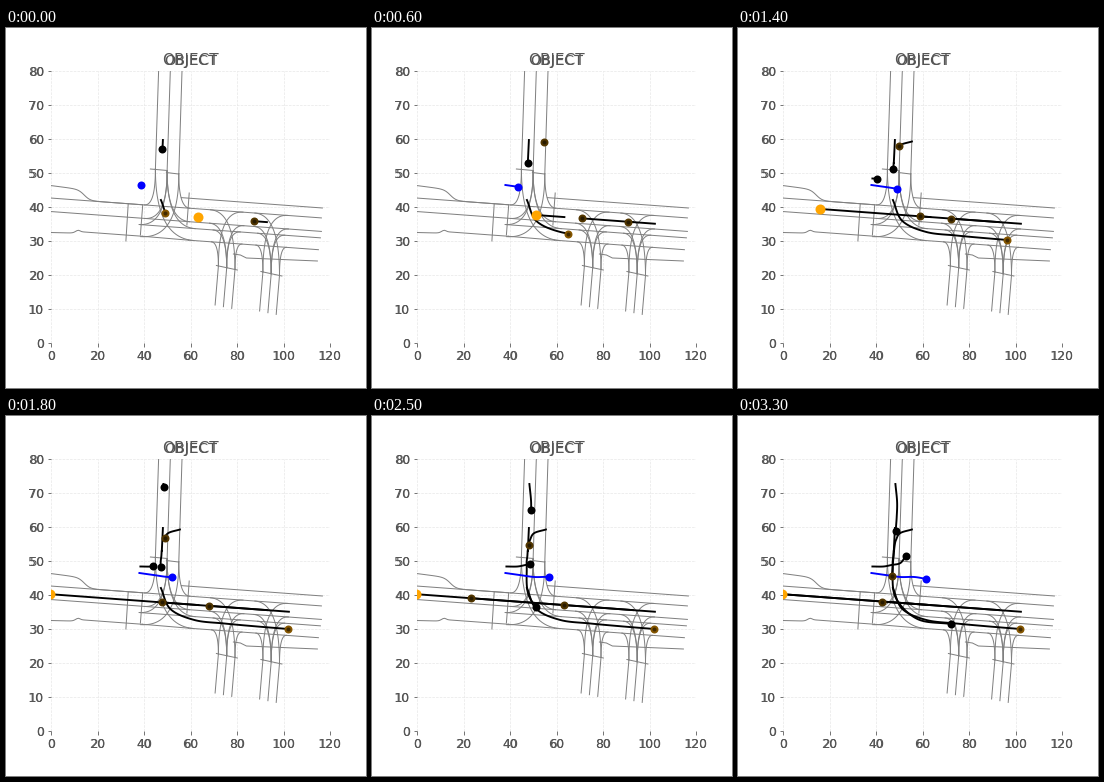
A matplotlib script that plays this animation: 360 px wide and 360 px high, repeating every 3400 ms.

```python
import numpy as np
import matplotlib.pyplot as plt
from matplotlib.animation import FuncAnimation

FRAMES, STEP = 34, 100
SIZE, DPI = 360, 72
LEFT, RIGHT, TOP, BOTTOM = 45, 324, 43.2, 315
INK, ROAD, ORANGE = "#555555", "#808080", "#ffa500"
BROWN, UMBER = "#855600", "#523600"
SLOPE = 0.0735                      # heading of the main road
LANES = 170, 183.5, 190, 202        # lane borders at the left edge

plt.rcParams.update({"font.family": "DejaVu Sans", "font.size": 12})

fig = plt.figure(figsize=(SIZE / DPI, SIZE / DPI), dpi=DPI, facecolor="white")
ax = fig.add_axes([LEFT / SIZE, 1 - BOTTOM / SIZE,
                   (RIGHT - LEFT) / SIZE, (BOTTOM - TOP) / SIZE])
ax.set(xlim=(0, 120), ylim=(0, 80), autoscale_on=False)
ax.set_xticks(range(0, 121, 20))
ax.set_yticks(range(0, 81, 10))
ax.tick_params(color=INK, labelbottom=False, labelleft=False)
ax.grid(color="#e8e8e8", linestyle="--", linewidth=0.7)
ax.set_axisbelow(True)
for spine in ax.spines.values():
    spine.set_visible(False)


def label(text, xy, offset, size=12, **align):
    """Lettering set twice at slightly different sizes, as a double print."""
    for scale in (1, 1.055):
        ax.annotate(text, xy, offset, xycoords="axes fraction",
                    textcoords="offset points", color=INK,
                    fontsize=size * scale, annotation_clip=False, **align)


label("OBJECT", (0.5, 1), (0, 6), 14.4, ha="center", va="baseline")
for v in ax.get_xticks():
    label(f"{v:.0f}", (v / 120, 0), (0, -7), ha="center", va="top")
for v in ax.get_yticks():
    label(f"{v:.0f}", (0, v / 80), (-7, 0), ha="right", va="center_baseline")


def world(points):
    """Stage pixels (y down) to map units."""
    x, y = np.asarray(points, float).T
    return ((x - LEFT - 0.6) * 120 / (RIGHT - LEFT),
            (BOTTOM - y) * 80 / (BOTTOM - TOP))


def main(x, y0):
    return y0 + SLOPE * (x - LEFT)


def road(*points):
    ax.plot(*world(points), color=ROAD, lw=1, zorder=2)


def lane(y0, x0, x1):
    road((x0, main(x0, y0)), (x1, main(x1, y0)))


def turn(start, corner, end):
    s = np.linspace(0, 1, 24)[:, None]
    a, b, c = map(np.array, (start, corner, end))
    road(*((1 - s) ** 2 * a + 2 * s * (1 - s) * b + s ** 2 * c))


def junction(ends, borders, reach, spread):
    """Join three arm lines to the main road; borders run near to far."""
    for side in (-1, 1):
        for i, y0 in zip((0, 1, 1, 2), borders):
            x, y = ends[i if side < 0 else 2 - i]
            far = x + side * (reach + spread * abs(y0 - borders[0]))
            turn((x, y), (x, main(x, y0)), (far, main(far, y0)))


# main road: through lanes, north kerb, south kerb with a small bump
for y0 in LANES[:2]:
    lane(y0, LEFT, 316)
lane(LANES[2], 135, 315)
lane(LANES[3], 183, 313)
lane(160, 176, 317)
x = np.linspace(LEFT, 137, 60)
ease = 1 / (1 + np.exp((79 - x) / 3))
road(*zip(x, (1 - ease) * (157.5 + 0.13 * (x - LEFT)) + ease * main(x, 170)))
bump = 3 / (1 + np.exp((x - 69) / 1.2)) - 2.5 * np.exp(-((x - 73) / 2.5) ** 2)
road(*zip(x, main(x, 201.5) + bump * (1 - (x - LEFT) / 60).clip(0)))
road((137, main(137, 201.5)), (183, main(183, 202)))
road((228, 226), (235, 227), (241, 230), (312, 233))

# north arm
north = [(150 + 11.7 * i, 141 + 2.4 * i) for i in range(3)]
for x, y in north:
    road((x + 3.2, 43), (x, y))
junction(north, LANES, 11, 0.85)
road((145, 141), (162, 142.5))
road((161, 144.5), (173, 146))
for x, top, foot in ((122, 176, 213), (136.5, 177, 207), (183, 165, 197)):
    road((x + 0.8, top), (x - 1.5, foot))

# two south arms
for x0, y0 in ((213, 238), (257.5, 244)):
    south = [(x0 + 8.3 * i, y0 + 1.7 * i) for i in range(3)]
    for x, y in south:
        road((x, y), (x - 3.3, y + 39))
    junction(south, LANES[::-1], 7, 0.55)
    road((x0 - 2, y0 - 0.5), (x0 + 19, y0 + 4))


def spline(knots, u):
    """Smooth curve through knots evenly spaced over u in 0..1."""
    u = np.clip(u, 0, 1) * (len(knots) - 1)
    i = np.minimum(u.astype(int), len(knots) - 2)
    s, m = (u - i)[:, None], np.gradient(knots, axis=0)
    return ((1 + 2 * s) * (1 - s) ** 2 * knots[i] + s * (1 - s) ** 2 * m[i]
            + s * s * (3 - 2 * s) * knots[i + 1] + s * s * (s - 1) * m[i + 1])


class Track:
    """A dot with its trail, passing its knots at even times."""

    def __init__(self, start, end, *knots, color="black", size=8, z=4):
        self.start, self.end = start, end
        self.knots = np.array(knots, float)
        trail = "blue" if color == "blue" else "black"
        self.trail, = ax.plot([], [], color=trail, lw=1.9, zorder=3)
        self.dots = ax.plot([], [], "o", color=color, ms=size, mew=0, zorder=z)
        if color in (BROWN, UMBER):
            self.dots += ax.plot([], [], "o", color="black", alpha=0.5,
                                 ms=4, mew=0, zorder=z)

    def update(self, now):
        x = y = np.array([])
        if now > self.start or now == 0 == self.start:
            u = np.linspace(0, (now - self.start) / (self.end - self.start), 120)
            x, y = world(spline(self.knots, u))
        self.trail.set_data(x, y)
        for dot in self.dots:
            dot.set_data(x[-1:], y[-1:])


def westbound(start, end, *xs, **style):
    return Track(start, end, *((x, main(x, 178.2)) for x in xs), **style)


tracks = [
    Track(-200, 3300, (157.5, 112), (156.5, 133), (156.3, 135), (156, 139.5),
          (155.3, 151), (158, 181), (180, 203), (213.5, 208)),
    Track(1700, 3300, (158, 68), (159.7, 86), (159.3, 101), (158.3, 114.5)),
    Track(1200, 3300, (135, 150.5), (146, 150.5), (154, 149), (163, 147),
          (168.5, 139.5)),
    Track(500, 3300, (174.5, 113.5), (163, 117), (159, 123), (157, 131.5),
          (154.5, 159.5), color=UMBER),
    westbound(250, 3300, 283.5, 228, 204, 191.5, 144.5, color=UMBER),
    westbound(-200, 3200, 261.5, 208, 178, 111, 45, color=UMBER),
    Track(-200, 1550, (155.5, 172), (165, 193), (189, 204), (219, 207.5),
          (252, 210.5), (283, 213), color=BROWN),
    Track(-100, 3300, (134, 157), (149.5, 159.2), (163, 161), (177, 161),
          (189, 163), color="blue"),
    westbound(0, 1750, 193, 177, 139, 92, 45, color=ORANGE, size=10, z=5),
]


def draw(frame):
    for track in tracks:
        track.update(frame * STEP)


anim = FuncAnimation(fig, draw, frames=FRAMES, init_func=lambda: draw(0),
                     interval=STEP, repeat=True, repeat_delay=0, blit=False)
plt.show()
```
